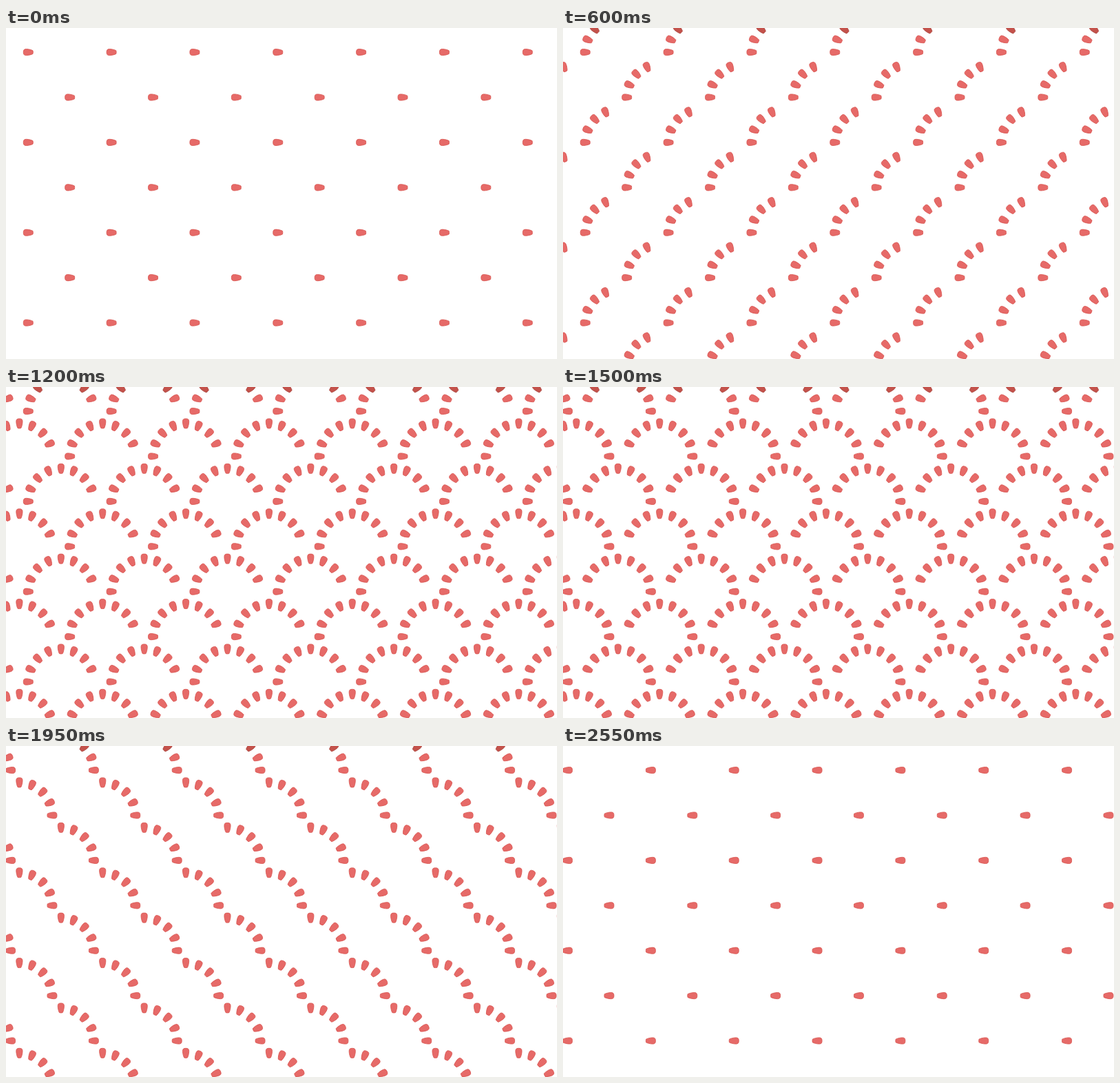
An HTML page without scripts for the animation above (2700 ms loop, 800 by 480 pixels).

```html
<!DOCTYPE html>
<html lang="en">
<head>
<meta charset="utf-8">
<title>Scallop fans</title>
<style>
  html, body { margin: 0; width: 100%; height: 100%; overflow: hidden; background: #fff; }
  svg { display: block; width: 800px; height: 480px; }

  /* Nine petals span a half circle; each layer repeats petal k over every fan. */
  .petal {
    fill: #e66a68;
    stroke: #d9534f;
    stroke-width: .8;
    transform: rotate(calc(var(--k) * 22.5deg - 90deg));
  }
  .edge .petal, .edge { --fill: var(--shade); }
  .petal { fill: var(--fill, #e66a68); stroke: var(--line, #d9534f); }
  .edge { --line: var(--shade-line); }
  .shaded { --shade: #c4524b; --shade-line: #a8423a; }

  /* Each layer shows for half the loop, one beat after the last. */
  .layer {
    visibility: hidden;
    animation: show 2700ms step-end infinite;
    animation-delay: calc((var(--k) - 17) * 150ms);
  }
  .first { animation-name: show-first; animation-delay: 0ms; }

  @keyframes show {
    0% { visibility: visible; }
    50%, 100% { visibility: hidden; }
  }
  @keyframes show-first {
    0% { visibility: visible; }
    55.555%, 100% { visibility: hidden; }
  }
</style>
</head>
<body>
<svg viewBox="0 0 800 480" xmlns="http://www.w3.org/2000/svg">
  <defs>
    <path id="petal" class="petal" d="M-2.3-40.8Q0-40.2 2.3-40.8C3.3-42.2 4.6-47 4.6-50.3C4.6-53.4 3.4-54.6 0-54.6S-4.6-53.4-4.6-50.3C-4.6-47-3.3-42.2-2.3-40.8Z"/>
    <g id="row">
      <use href="#petal"/>
      <use href="#petal" x="120.83"/>
      <use href="#petal" x="241.67"/>
      <use href="#petal" x="362.5"/>
      <use href="#petal" x="483.33"/>
      <use href="#petal" x="604.17"/>
      <use href="#petal" x="725"/>
      <use href="#petal" x="845.83"/>
    </g>
    <g id="grid">
      <use href="#row" class="edge" x="-41" y="35.1"/>
      <use href="#row" x="19.4" y="100.5"/>
      <use href="#row" x="-41" y="165.9"/>
      <use href="#row" x="19.4" y="231.3"/>
      <use href="#row" x="-41" y="296.7"/>
      <use href="#row" x="19.4" y="362.1"/>
      <use href="#row" x="-41" y="427.5"/>
      <use href="#row" x="19.4" y="492.9"/>
    </g>
  </defs>
  <use href="#grid" class="layer first" style="--k:0"/>
  <use href="#grid" class="layer" style="--k:1"/>
  <use href="#grid" class="layer shaded" style="--k:2"/>
  <use href="#grid" class="layer" style="--k:3"/>
  <use href="#grid" class="layer" style="--k:4"/>
  <use href="#grid" class="layer" style="--k:5"/>
  <use href="#grid" class="layer shaded" style="--k:6"/>
  <use href="#grid" class="layer" style="--k:7"/>
  <use href="#grid" class="layer" style="--k:8"/>
</svg>
</body>
</html>
```
